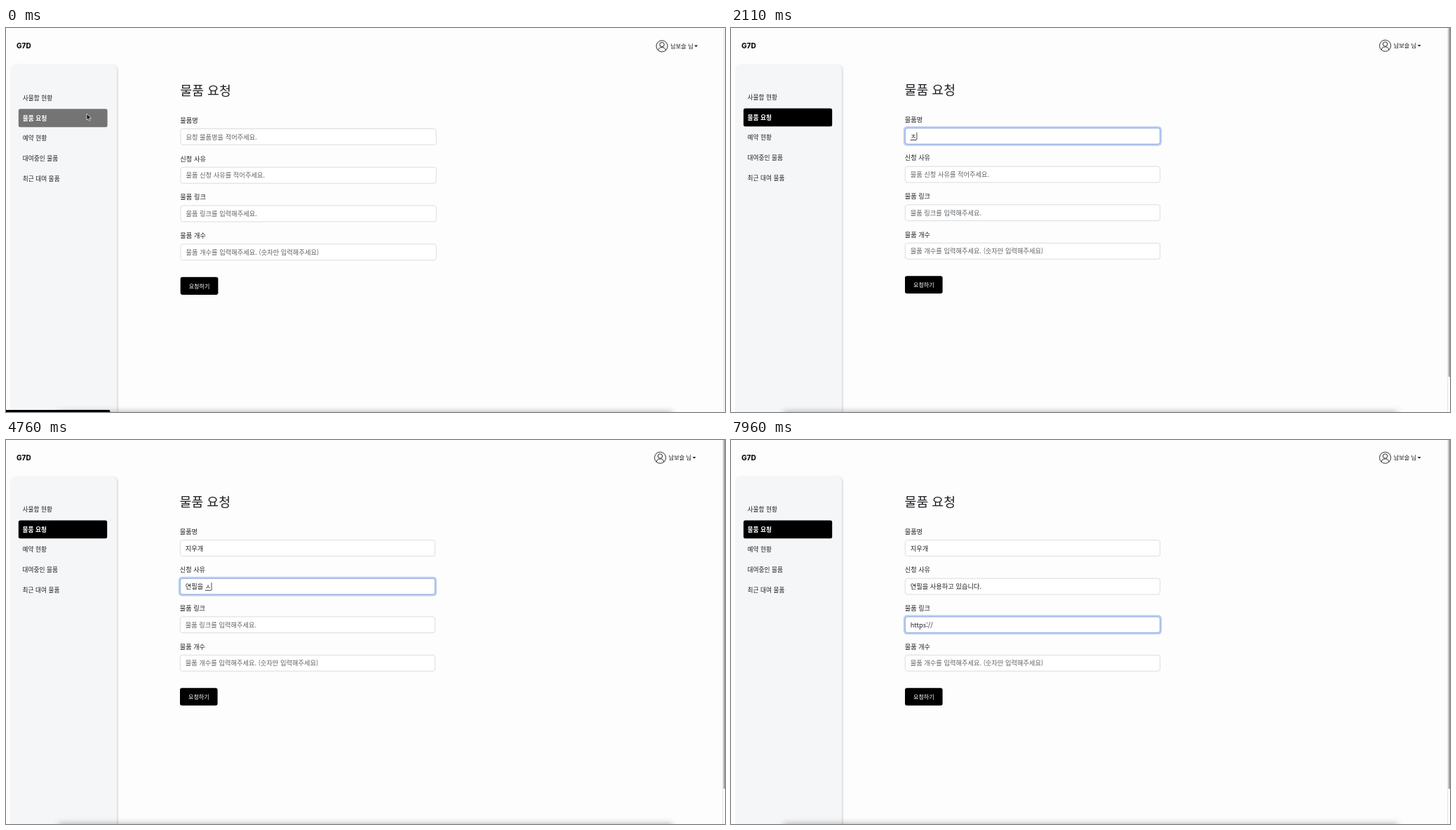
Recreate the animation shown at these times as an HTML page. Size 1025 px wide and 547 px high, loop 8000 ms.

```html
<!DOCTYPE html>
<html lang="ko">
<head>
<meta charset="utf-8">
<title>물품 요청</title>
<style>
  html, body { margin: 0; width: 100%; height: 100%; overflow: hidden; background: #fdfdfd; }
  svg { display: block; width: 100vw; height: 100vh; }
  text { font-family: "Noto Sans CJK KR", "Noto Sans KR", sans-serif; white-space: pre; fill: #1d1f22; }
  .logo { font: 800 10px Inter, sans-serif; fill: #111; }
  .title { font-size: 18.3px; font-weight: 500; }
  .menu { font-size: 8.7px; font-weight: 500; }
  .label { font-size: 9.2px; font-weight: 500; }
  .value { font-size: 9.25px; }
  .hint { font-size: 9.25px; fill: #5e6165; }
  .user { font-size: 8.2px; font-weight: 500; }
  .button { font-size: 8.05px; fill: #fff; }
</style>
</head>
<body>
<svg id="stage" viewBox="0 0 1025 547" preserveAspectRatio="none">
  <defs>
    <filter id="soft" x="-10%" y="-400%" width="120%" height="900%"><feGaussianBlur stdDeviation="5"/></filter>
    <filter id="edge" x="-10%" y="-10%" width="120%" height="120%"><feGaussianBlur stdDeviation="1.6"/></filter>
  </defs>
  <rect width="1025" height="547" fill="#fdfdfd"/>
  <rect x="9" y="53" width="150" height="520" rx="7" fill="#c9cbce" filter="url(#edge)"/>
  <rect x="6" y="52" width="152" height="520" rx="7" fill="#f5f6f8"/>
  <g id="page">
    <text class="logo" x="15" y="28.7">G7D</text>
    <g id="menu"><rect id="active" x="17.8" y="114.4" width="126.4" height="25.8" rx="2.5"/></g>
    <text class="title" x="247.6" y="95">물품 요청</text>
    <g id="form"></g>
    <rect x="248" y="353.3" width="53.6" height="25" rx="2.8"/>
    <text class="button" x="260" y="369">요청하기</text>
    <g fill="none" stroke="#222" stroke-width=".9">
      <circle cx="932.6" cy="25.2" r="8.1" fill="#f4f4f4"/>
      <circle cx="932.6" cy="23" r="3.2"/>
      <path d="M927.2 31.2C927.8 28 930 26.9 932.6 26.9S937.4 28 938 31.2"/>
    </g>
    <text class="user" x="944.7" y="28.3">남보슬 님</text>
    <path d="M978.6 23.9h5l-2.5 2.7z" fill="#1d1f22"/>
  </g>
  <rect x="75" y="547" width="875" height="12" fill="#555" opacity=".5" filter="url(#soft)"/>
  <path id="rail" d="M0 0V547" stroke="#dfdfdf" stroke-width=".9"/>
  <rect id="thumb" x="1022.8" y="-4" width="4" height="501" rx="1.5" fill="#a3a3a3"/>
  <path id="status" d="M0 547V544H146.5Q148.5 544 148.5 547Z"/>
  <g id="cursor">
    <path id="arrow" d="M0 0V9L2.1 7.2L3.5 10.2L5 9.5L3.6 6.6H6.4Z" fill="#111" stroke="#fff" stroke-width=".7"/>
    <path id="beam" d="M-2.4 -4.5Q0 -4.5 0 -3.3Q0 -4.5 2.4 -4.5M0 -3.5V3.5M-2.4 4.5Q0 4.5 0 3.3Q0 4.5 2.4 4.5M-1.2 1.2H1.2" fill="none" stroke="#222" stroke-width="1"/>
  </g>
</svg>
<script>
const LOOP = 8000, GAP = 54.6, LEFT = 255.7;
const $ = id => document.getElementById(id);

function add(parent, tag, attrs, text) {
  const el = document.createElementNS('http://www.w3.org/2000/svg', tag);
  for (const k in attrs) el.setAttribute(k, attrs[k]);
  if (text) el.textContent = text;
  parent.append(el);
  return el;
}
const show = (el, on) => el.setAttribute('visibility', on ? 'visible' : 'hidden');
const clamp = v => Math.max(0, Math.min(1, v));
const within = (t, [a, b]) => t >= a && t < b;

['사물함 현황', '물품 요청', '예약 현황', '대여중인 물품', '최근 대여 물품'].forEach((name, i) => {
  const item = add($('menu'), 'text', { class: 'menu', x: 23.6, y: 101.8 + i * 28.8 }, name);
  if (i === 1) item.style.cssText = 'fill:#fff;font-weight:700';
});

// Keys: time of each edit and the text it leaves behind
const keys = (times, states) => states.split('|').map((s, i) => [times[i], s]);
const every = (from, step, n) => Array.from({ length: n }, (_, i) => from + step * i);

const fields = [
  { label: '물품명', hint: '요청 물품명을 적어주세요.', focus: [1160, 3060],
    caret: [[1230, 1510], [1790, 3060]],
    keys: keys([1990, 2180, 2250, 2320, 2450, 2580], 'ㅈ|지|징|지우|지욱|지우개') },
  { label: '신청 사유', hint: '물품 신청 사유를 적어주세요.', focus: [3060, 6540],
    caret: [[3460, 6270]],
    keys: [
      ...keys(every(3730, 77, 10), 'ㅇ|여|연|연ㅍ|연피|연필|연필ㅇ|연필으|연필을|연필을 '),
      ...keys([4750, 4830, 4890, 4960, 5010, 5080, 5140, 5190, 5240, 5270, 5300, 5320, 5390, 5460, 5540, 5600, 5640, 5670, 5720, 5740, 5800],
        'ㅅ|사|상|사요|사용|사용ㅎ|사용하|사용학|사용하고|사용하고 |사용하고 ㅇ|사용하고 이|사용하고 있|사용하고 있ㅅ|사용하고 있스|사용하고 있습|사용하고 있습ㄴ|사용하고 있습니|사용하고 있습닏|사용하고 있습니다|사용하고 있습니다.')
        .map(([t, s]) => [t, '연필을 ' + s])
    ] },
  { label: '물품 링크', hint: '물품 링크를 입력해주세요.', focus: [6540, LOOP + 500],
    caret: [[6610, 6760]],
    keys: keys([6760, 6890, 7030, 7090, 7230, 7500, 7700, 7950], 'h|ht|htt|http|https|https:|https:/|https://') },
  { label: '물품 개수', hint: '물품 개수를 입력해주세요. (숫자만 입력해주세요)', focus: [LOOP * 2, LOOP * 3], caret: [], keys: [] }
];

fields.forEach((f, i) => {
  const g = add($('form'), 'g', { transform: `translate(0 ${i * GAP})` });
  const box = { x: 248.3, y: 142.6, width: 363.4, height: 22.8, rx: 3.3 };
  add(g, 'text', { class: 'label', x: 247.7, y: 133.9 }, f.label);
  f.ring = add(g, 'rect', { x: 245.8, y: 140.1, width: 368.4, height: 27.8, rx: 5, fill: '#bfd2f5' });
  add(g, 'rect', { ...box, fill: '#fff', stroke: '#d6d9dc', 'stroke-width': .9 });
  f.line = add(g, 'rect', { ...box, fill: 'none', stroke: '#8aa9e4', 'stroke-width': 1 });
  f.hintText = add(g, 'text', { class: 'hint', x: LEFT, y: 157.5 }, f.hint);
  f.value = add(g, 'text', { class: 'value', x: LEFT, y: 157.5 });
  f.under = add(g, 'rect', { y: 159.1, height: .9, fill: '#222' });
  f.bar = add(g, 'rect', { y: 148.6, width: .8, height: 11, fill: '#222' });
});

function drawField(f, t) {
  const glow = clamp((t - f.focus[0]) / 150) - clamp((t - f.focus[1]) / 150);
  f.ring.setAttribute('opacity', glow);
  f.line.setAttribute('opacity', glow);

  let text = '';
  for (const [at, s] of f.keys) if (t >= at) text = s;
  if (f.value.textContent !== text) f.value.textContent = text;
  show(f.hintText, !text);

  const end = text ? f.value.getSubStringLength(0, text.length) : 0;
  const composing = within(t, f.focus) && /[ㄱ-ㅎ가-힣]$/.test(text);
  if (composing) {
    const width = f.value.getSubStringLength(text.length - 1, 1);
    f.under.setAttribute('x', LEFT + end - width);
    f.under.setAttribute('width', width);
  }
  show(f.under, composing);
  f.bar.setAttribute('x', LEFT + end + .3);
  show(f.bar, f.caret.some(span => within(t, span)));
}

// Pointer path: time, x, y
const path = [
  [0, 115, 122], [670, 115, 122], [740, 190, 135], [810, 266, 147], [1010, 285, 149.5],
  [2650, 285, 149.5], [2780, 390, 178], [2910, 570, 212], [2980, 647, 228], [3060, 545, 215], [3130, 530, 212.5],
  [6010, 530, 212.5], [6200, 670, 200], [6330, 786, 194], [6460, 660, 240], [6540, 520, 266], [LOOP, 520, 266]
];
const hidden = [[1990, 2650], [3730, 6010], [6760, LOOP]];

function drawCursor(t) {
  const i = path.findIndex(p => p[0] > t);
  const [t0, x0, y0] = path[i - 1], [t1, x1, y1] = path[i];
  const k = (t - t0) / (t1 - t0);
  const x = x0 + (x1 - x0) * k, y = y0 + (y1 - y0) * k;
  const on = !hidden.some(span => within(t, span));
  const overField = x > 248 && x < 612 && fields.some((f, n) => Math.abs(y - 154 - n * GAP) < 12);
  $('cursor').setAttribute('transform', `translate(${x} ${y})`);
  show($('arrow'), on && !overField);
  show($('beam'), on && overField);
}

function draw(t) {
  const narrow = t >= 460;
  $('page').setAttribute('transform', narrow ? '' : 'translate(0 .6) scale(1.0027)');
  $('rail').setAttribute('transform', `translate(${narrow ? 1021.6 : 1023.6} 0)`);
  show($('thumb'), narrow);
  show($('status'), t < 740);
  $('active').setAttribute('fill', t < 740 ? '#747474' : '#000');
  fields.forEach(f => drawField(f, t));
  drawCursor(t);
}

const start = performance.now();
function tick() {
  draw((performance.now() - start) % LOOP);
  requestAnimationFrame(tick);
}
tick();
</script>
</body>
</html>
```
